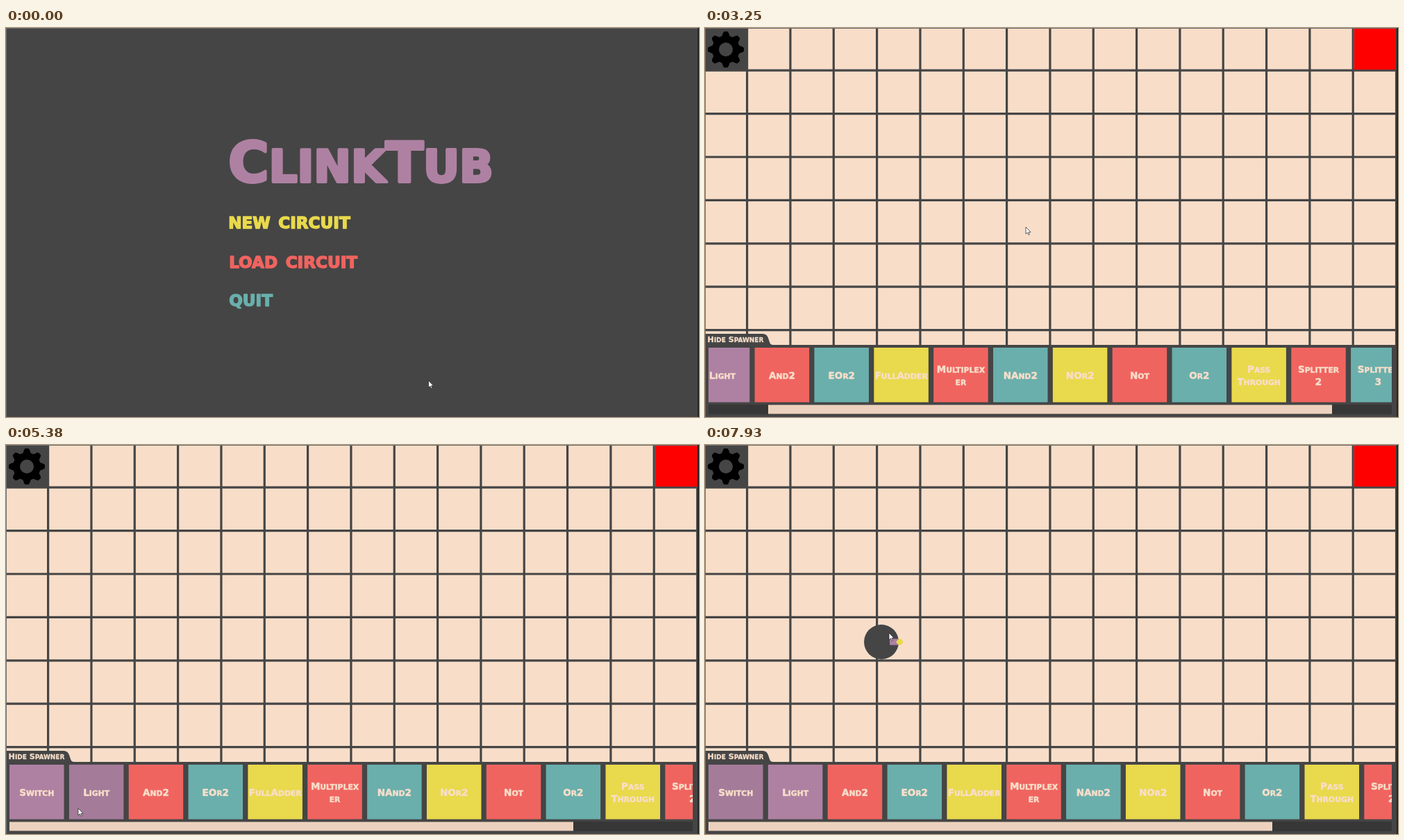
These frames come from a looping animation (998 px wide and 561 px high, 8000 ms). An HTML page:

```html
<!DOCTYPE html>
<html lang="en">
<head>
<meta charset="utf-8">
<title>Circuit builder</title>
<style>
  html, body { margin: 0; width: 100%; height: 100%; overflow: hidden; background: #454545; }
  svg { display: block; width: 998px; height: 561px; }
  text {
    font-family: "DejaVu Sans", sans-serif;
    font-weight: bold;
    stroke-linejoin: round;
  }
  .menu { word-spacing: 0.15em; }
</style>
</head>
<body>
<svg id="stage" viewBox="0 0 998 561" xmlns="http://www.w3.org/2000/svg"></svg>
<script>
const LOOP = 8000, STEP = 120;
const OPEN_BOARD = 3250, PRESS = 7190, DRAG = 7550;
const DARK = '#454545', CREAM = '#f8dec9';
const PURPLE = '#ae81a2', RED = '#f06460', TEAL = '#6aafac', YELLOW = '#e9d94c';

const PITCH = 85.85, CARD = 78.5, SCROLL_RATIO = 1.222, SCROLL_START = 86;
const NAMES = [
  'Switch', 'Light', 'And2', 'EOr2', 'FullAdder', 'Multiplex/er', 'NAnd2',
  'NOr2', 'Not', 'Or2', 'Pass/Through', 'Splitter/2', 'Splitter/3'
];
const cardColor = i => i < 2 ? PURPLE : [RED, TEAL, YELLOW][(i - 2) % 3];
const cardX = i => 5 + i * PITCH;

// The pointer walks in even steps to each stop.
const HOME = { x: 608.5, y: 508.5 };
const MOVES = [
  { at: 430, steps: 2, x: 613, y: 494 },
  { at: 1800, steps: 3, x: 635, y: 398 },
  { at: 2160, steps: 4, x: 472, y: 268 },
  { at: 2640, steps: 3, x: 468, y: 279 },
  { at: 3250, steps: 1, x: 462, y: 287 },
  { at: 3370, steps: 1, x: 448, y: 317 },
  { at: 3560, steps: 5, x: 402, y: 548 },
  { at: 4420, steps: 1, x: 377, y: 548 },
  { at: 4540, steps: 6, x: 257, y: 549 },
  { at: 5260, steps: 2, x: 104, y: 524 },
  { at: 5500, steps: 3, x: 30, y: 493 },
  { at: 5860, steps: 3, x: 42, y: 504 },
  { at: 7310, steps: 4, x: 176, y: 360 },
  { at: 7810, steps: 2, x: 265, y: 271 }
];

function pointerAt(t) {
  let { x, y } = HOME;
  for (const move of MOVES) {
    if (t < move.at) break;
    const part = Math.min(1, (Math.floor((t - move.at) / STEP) + 1) / move.steps);
    x += (move.x - x) * part;
    y += (move.y - y) * part;
  }
  return { x, y };
}

const clamp = (value, low, high) => Math.max(low, Math.min(high, value));
const inside = (p, x, y, width, height) =>
  p.x >= x && p.x < x + width && p.y >= y && p.y < y + height;

function add(parent, tag, attrs = {}) {
  const node = document.createElementNS('http://www.w3.org/2000/svg', tag);
  for (const key in attrs) node.setAttribute(key, attrs[key]);
  parent.append(node);
  return node;
}

const rect = (parent, x, y, width, height, fill, extra) =>
  add(parent, 'rect', { x, y, width, height, fill, ...extra });

// Capitals and digits use the full size, lower case becomes smaller capitals.
function label(parent, string, x, y, size, fill, weight = 0.5, extra = {}) {
  const text = add(parent, 'text', { x, y, fill, stroke: fill, 'stroke-width': weight, ...extra });
  for (const run of string.match(/[a-z]+|[^a-z]+/g)) {
    const small = /[a-z]/.test(run);
    add(text, 'tspan', { 'font-size': small ? size * 0.8 : size }).textContent = run.toUpperCase();
  }
  return text;
}

function buildMenu(parent) {
  const menu = add(parent, 'g');
  label(menu, 'ClinkTub', 320, 222, 80, PURPLE, 4);
  const plate = rect(menu, 313, 259, 227, 41.5, '#2b2b2b', { rx: 3 });
  const item = (string, y, fill) =>
    label(menu, string, 321.2, y, 23.1, fill, 1.5, { class: 'menu', 'font-size': 23.1 });
  const first = item('NEW CIRCUIT', 289, YELLOW);
  item('LOAD CIRCUIT', 346, RED);
  item('QUIT', 400.5, TEAL);
  return { menu, plate, first };
}

function gearPath(cx, cy) {
  const points = Array.from({ length: 160 }, (_, i) => {
    const a = i / 160 * 2 * Math.PI;
    const r = 23 + 3 * clamp(1.5 * Math.cos(8 * a), -1, 1);
    return `${cx + r * Math.cos(a)} ${cy + r * Math.sin(a)}`;
  });
  return `M${points.join('L')}Z`;
}

function buildGrid(parent) {
  rect(parent, 0, 0, 995, 458, CREAM);
  const line = { stroke: DARK, 'stroke-width': 3.2 };
  for (let i = 0; i < 16; i++) {
    const x = 60.6 + i * 62.33;
    add(parent, 'line', { x1: x, x2: x, y1: 0, y2: 458, ...line });
  }
  for (let i = 0; i < 7; i++) {
    const y = 61.2 + i * 62.4;
    add(parent, 'line', { x1: 0, x2: 995, y1: y, y2: y, ...line });
  }
  rect(parent, 0, 0, 62, 62, DARK);
  add(parent, 'path', { d: gearPath(30, 31), fill: '#000' });
  add(parent, 'circle', { cx: 30, cy: 31, r: 10, fill: DARK });
  rect(parent, 935, 1, 60, 59, '#f00');
}

function buildSpawner(parent) {
  add(parent, 'path', { d: 'M0 441H83q6 0 8 6l2 6q1 4 5 4H998V561H0Z', fill: DARK });
  label(parent, 'Hide Spawner', 3.5, 453, 11.2, CREAM, 0.3);

  const clip = add(add(parent, 'defs'), 'clipPath', { id: 'strip' });
  rect(clip, 5, 458, 984, 85, '#000');
  const row = add(add(parent, 'g', { 'clip-path': 'url(#strip)' }), 'g');
  const cards = NAMES.map((name, i) => {
    const card = rect(row, cardX(i), 461, CARD, 78.7, cardColor(i));
    const lines = name.split('/');
    lines.forEach((part, n) => {
      const y = 505.7 + (n - (lines.length - 1) / 2) * 18;
      label(row, part, cardX(i) + CARD / 2, y, 13.5, CREAM, 0.5, { 'text-anchor': 'middle' });
    });
    return card;
  });

  rect(parent, 5, 543, 984, 14, '#373737');
  const thumb = rect(parent, 5, 543.5, 812, 13, '#ecd2be');
  return { row, cards, thumb };
}

function buildPart(parent) {
  const part = add(parent, 'g');
  add(part, 'circle', { r: 25, fill: DARK });
  rect(part, 12, -4.5, 13, 9, PURPLE);
  add(part, 'path', { d: 'M21 0l4-4.5h3l4 4.5-4 4.5h-3Z', fill: YELLOW });
  return part;
}

const stage = document.getElementById('stage');
rect(stage, 0, 0, 998, 561, DARK);
const { menu, plate, first } = buildMenu(stage);
const board = add(stage, 'g');
buildGrid(board);
const { row, cards, thumb } = buildSpawner(board);
const part = buildPart(board);
rect(stage, 0, 0, 998, 1, '#6c6c6c');
rect(stage, 0, 0, 1, 561, '#6c6c6c');
rect(stage, 996, 0, 2, 561, '#242424');
const pointer = add(stage, 'path', {
  d: 'M0 0V10L2.3 8 4 11.4 5.4 10.7 3.9 7.4H7Z',
  fill: '#fff', stroke: '#222', 'stroke-width': 0.7
});

const show = (node, on) => node.setAttribute('display', on ? 'inline' : 'none');
const move = (node, x, y) => node.setAttribute('transform', `translate(${x} ${y})`);

function draw(t) {
  const p = pointerAt(t);
  move(pointer, p.x, p.y);
  show(menu, t < OPEN_BOARD);
  show(board, t >= OPEN_BOARD);

  const onItem = inside(p, 313, 259, 227, 41);
  show(plate, onItem);
  first.setAttribute('transform', `translate(321 281) scale(${onItem ? 1.19 : 1}) translate(-322 -281)`);

  // The thumb stays under the pointer while dragged to the left end.
  const offset = clamp(p.x - 300, 0, SCROLL_START);
  const scroll = offset * SCROLL_RATIO;
  move(thumb, offset, 0);
  move(row, -scroll, 0);

  const pressed = t >= PRESS && t < DRAG;
  cards.forEach((card, i) => {
    const active = t >= PRESS ? i === 0 : inside(p, cardX(i) - scroll, 461, CARD, CARD);
    card.setAttribute('fill-opacity', !active ? 1 : pressed ? 0.72 : 0.9);
  });

  show(part, t >= DRAG);
  move(part, p.x - 11, p.y + 13);
}

const start = performance.now();
function tick() {
  draw((performance.now() - start) % LOOP);
  requestAnimationFrame(tick);
}
tick();
</script>
</body>
</html>
```
